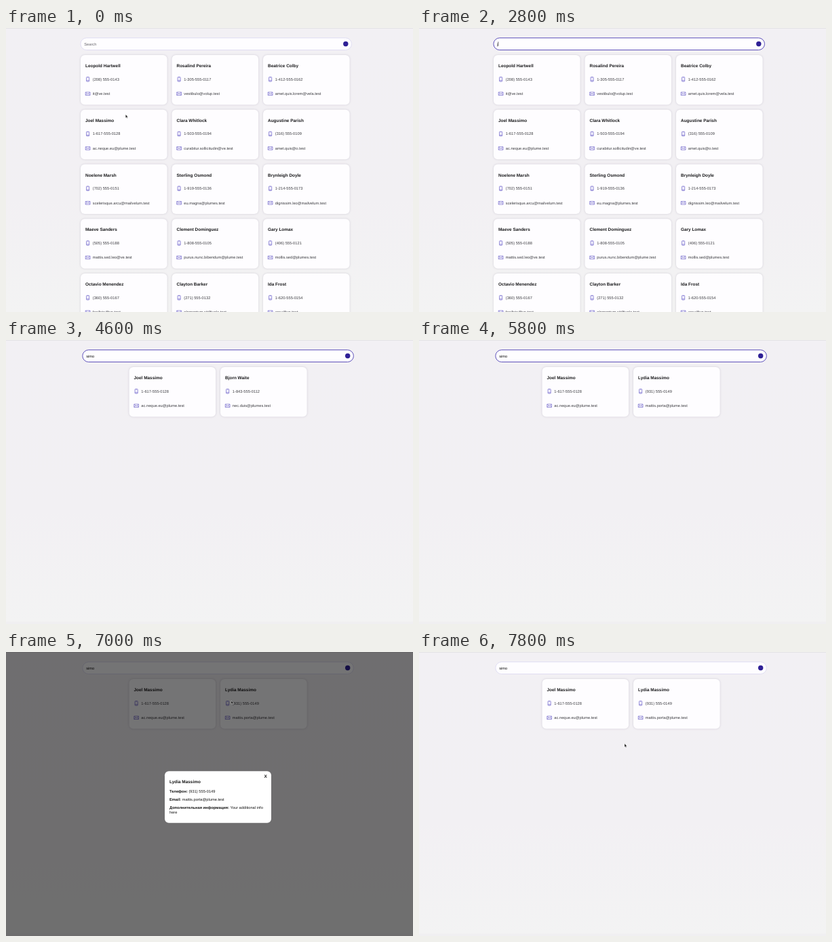
Animation of 600 by 420 pixels, one loop 8 s. Source, as an HTML page:

```html
<!DOCTYPE html>
<html lang="en">
<head>
<meta charset="utf-8">
<title>Contacts</title>
<style>
  html, body { margin: 0; width: 100%; height: 100%; overflow: hidden; background: #f2f1f3; }
  svg { display: block; width: 600px; height: 420px; }
  text { font: 5.71px "Liberation Sans", Arial, sans-serif; fill: #3c3c40; text-rendering: geometricPrecision; }
  .name { font-size: 6.43px; font-weight: bold; fill: #1a1a1c; }
  .bold { font-weight: bold; }
  .dark text { fill: #161616; }
  .card { fill: #fefdff; filter: drop-shadow(0 .9px 1.6px rgba(40, 30, 70, .17)); }
  .icon { fill: none; stroke: #6a5fc8; stroke-width: .65; }
  .field { fill: #fefdff; stroke: #dad7f0; stroke-width: .8; }
  .focus .field { stroke: #4d3fb4; stroke-width: .9; }
  #query { fill: #111; }
  #hint { fill: #66656b; }
</style>
</head>
<body>
<svg viewBox="0 0 600 420">
  <defs>
    <linearGradient id="sky" x2="0" y2="1">
      <stop offset="0" stop-color="#f2f0f4"/>
      <stop offset=".6" stop-color="#f2f0f3"/>
      <stop offset="1" stop-color="#f3f3f3"/>
    </linearGradient>
    <g id="phone" class="icon">
      <rect x="-2.1" y="-3.3" width="4.2" height="6.6" rx=".8" fill="#f1effc"/>
      <path d="M-2 2H2M-.6 -2.7H.6"/>
    </g>
    <g id="mail" class="icon">
      <rect x="-3.4" y="-2.3" width="6.8" height="4.6" rx=".3"/>
      <path d="M-3.3 -2.1L0 .5L3.3 -2.1M-3.3 2.1L-1.1 -.2M3.3 2.1L1.1 -.2"/>
    </g>
  </defs>
  <rect width="600" height="420" fill="url(#sky)"/>
  <rect width="600" height="1" fill="#e3e2e5"/>
  <rect id="foot" y="416.5" width="600" height="3.5" fill="#f0eff1"/>
  <g id="search">
    <rect class="field" x="109.9" y="14.7" width="399.6" height="17.8" rx="8.9"/>
    <text id="hint" x="115.3" y="25.5">Search</text>
    <text id="query" x="115.3" y="25.5"></text>
    <rect id="caret" y="20.3" width=".6" height="6.4" fill="#111"/>
    <circle cx="500.8" cy="23.5" r="3.7" fill="#2f2096"/>
  </g>
  <g id="lists"></g>
  <g id="modal" class="dark">
    <rect width="600" height="420" fill="#000" opacity=".54"/>
    <rect x="234" y="176.2" width="157" height="76.6" rx="6" fill="#fff"/>
    <text class="name" x="241" y="193.8" id="who"></text>
    <text x="241" y="207.8"><tspan class="bold">Телефон:</tspan> <tspan id="tel"></tspan></text>
    <text x="241" y="220"><tspan class="bold">Email:</tspan> <tspan id="box"></tspan></text>
    <text x="241" y="232.2"><tspan class="bold">Дополнительная информация:</tspan> Your additional info</text>
    <text x="241" y="238.7">here</text>
    <text class="name" x="380.6" y="186.2">X</text>
  </g>
  <g id="pointer">
    <path id="arrow" d="M0 0V4.9L1.15 3.85L1.9 5.6L2.75 5.2L2 3.55H3.5Z" fill="#111" stroke="#fff" stroke-width=".35"/>
    <path id="beam" d="M-1.2 -3Q0 -3 0 -2.2V2.2Q0 3 -1.2 3M1.2 -3Q0 -3 0 -2.2M0 2.2Q0 3 1.2 3" fill="none" stroke="#222" stroke-width=".75"/>
    <path id="hand" d="M-.9 -2.6Q-.4 -3.2 .1 -2.6V-.8L2.2 -.3Q2.8 0 2.6 .9L2 2.9H-.9L-2.5 .8Q-2.3 .1 -1.6 .4L-.9 .9Z" fill="#fff" stroke="#111" stroke-width=".65"/>
  </g>
</svg>
<script>
const $ = id => document.getElementById(id);

const people = `
Leopold Hartwell|(208) 555-0143|it@ve.test
Rosalind Pereira|1-305-555-0117|vestibulo@volup.test
Beatrice Colby|1-412-555-0162|amet.quis.lorem@vela.test
Joel Massimo|1-617-555-0128|ac.neque.eu@plume.test
Clara Whitlock|1-503-555-0194|curabitur.sollicitudin@ve.test
Augustine Parish|(316) 555-0109|amet.quis@o.test
Noelene Marsh|(702) 555-0151|scelerisque.arcu@mailvelum.test
Sterling Osmond|1-919-555-0136|eu.magna@plumes.test
Brynleigh Doyle|1-214-555-0173|dignissim.leo@mailvelum.test
Maeve Sanders|(505) 555-0188|mattis.sed.leo@ve.test
Clement Dominguez|1-808-555-0105|purus.nunc.bibendum@plume.test
Gary Lomax|(406) 555-0121|mollis.sed@plumes.test
Octavio Menendez|(360) 555-0167|facilisis@ve.test
Clayton Barker|(271) 555-0132|elementum.sit@vela.test
Ida Frost|1-620-555-0154|arcu@ve.test
Edna Major|(724) 555-0176|mollis.integer@mailvelum.test
Bjorn Waite|1-843-555-0112|nec.duis@plumes.test
Lydia Massimo|(931) 555-0149|mattis.porta@plume.test
`.trim().split('\n').map(line => line.split('|'));

const CARD = 127.6, STEP_X = 134.5, STEP_Y = 80.75;

const card = ([name, tel, mail], x, y) => `
  <g transform="translate(${x} ${y})">
    <rect class="card" width="${CARD}" height="73.4" rx="6"/>
    <text class="name" x="7" y="18">${name}</text>
    <use href="#phone" x="10.6" y="35.8"/><text x="17.8" y="37.7">${tel}</text>
    <use href="#mail" x="10.6" y="57.2"/><text x="17.8" y="59.1">${mail}</text>
  </g>`;

const row = ids => {
  const left = 312.6 - (CARD + STEP_X * (ids.length - 1)) / 2;
  return ids.map((id, i) => card(people[id], left + STEP_X * i, 40)).join('');
};

const lists = {
  all: people.slice(0, 15).map((p, i) =>
    card(p, 110 + STEP_X * (i % 3), 40 + STEP_Y * Math.floor(i / 3))).join(''),
  trio: row([3, 15, 16]),
  pair: row([3, 16]),
  family: row([3, 17])
};
$('lists').innerHTML = Object.entries(lists)
  .map(([id, html]) => `<g id="${id}">${html}</g>`).join('');
['who', 'tel', 'box'].forEach((id, i) => $(id).textContent = people[17][i]);

// Each step changes only the listed properties.
const steps = [
  [0, { list: 'all', query: '', caret: 0, focus: 0, modal: 0, pointer: ['arrow', 176.3, 128] }],
  [200, { pointer: ['hand', 177, 125] }],
  [400, { pointer: ['arrow', 176, 116] }],
  [600, { pointer: ['hand', 174, 98] }],
  [800, { pointer: ['hand', 171, 74] }],
  [1000, { pointer: ['hand', 167, 48] }],
  [1200, { pointer: ['beam', 164, 27] }],
  [1400, { pointer: ['beam', 163.3, 22] }],
  [1600, { pointer: ['beam', 163.3, 21.4] }],
  [1800, { focus: 1, caret: 1 }],
  [2000, { pointer: ['hand', 180, 68] }],
  [2200, { pointer: ['hand', 222, 160] }],
  [2400, { pointer: ['hand', 253, 231], caret: 0 }],
  [2600, { caret: 1 }],
  [2800, { query: 'j', pointer: null }],
  [3200, { list: 'trio' }],
  [3400, { query: 'jo' }],
  [4000, { query: 'joe' }],
  [4200, { list: 'pair' }],
  [4600, { query: 'simo', caret: 0 }],
  [5000, { list: 'family' }],
  [5200, { caret: 1 }],
  [5800, { caret: 0 }],
  [6200, { caret: 1, pointer: ['arrow', 284, 128] }],
  [6400, { pointer: ['hand', 304, 92] }],
  [6600, { caret: 0, focus: 0, pointer: ['hand', 324, 64] }],
  [6800, { pointer: ['hand', 328.4, 59.4] }],
  [7000, { modal: 1, pointer: ['arrow', 332, 72] }],
  [7200, { pointer: ['arrow', 356, 132] }],
  [7400, { pointer: ['arrow', 378, 178] }],
  [7600, { pointer: ['hand', 382.8, 186.6] }],
  [7800, { modal: 0, pointer: ['arrow', 303, 135.6] }]
];

const show = (id, on) => $(id).style.display = on ? '' : 'none';

function draw(s) {
  const full = s.list === 'all';
  Object.keys(lists).forEach(id => show(id, id === s.list));
  show('foot', !full);
  show('modal', s.modal);
  show('hint', !s.query);
  show('caret', s.caret);
  $('search').setAttribute('transform', `translate(${full ? 0 : 2.9})`);
  $('search').setAttribute('class', s.focus ? 'focus' : '');
  $('query').textContent = s.query;
  $('caret').setAttribute('x', 115.3 + (s.query ? $('query').getComputedTextLength() : 0));
  show('pointer', s.pointer);
  if (s.pointer) {
    const [kind, x, y] = s.pointer;
    ['arrow', 'beam', 'hand'].forEach(id => show(id, id === kind));
    $('pointer').setAttribute('transform', `translate(${x} ${y})`);
  }
}

const start = performance.now();
let last = -1;

function tick() {
  const t = (performance.now() - start) % 8000;
  const due = steps.filter(([at]) => at <= t);
  if (due.length !== last) {
    last = due.length;
    draw(Object.assign({}, ...due.map(([, change]) => change)));
  }
  requestAnimationFrame(tick);
}
tick();
</script>
</body>
</html>
```
